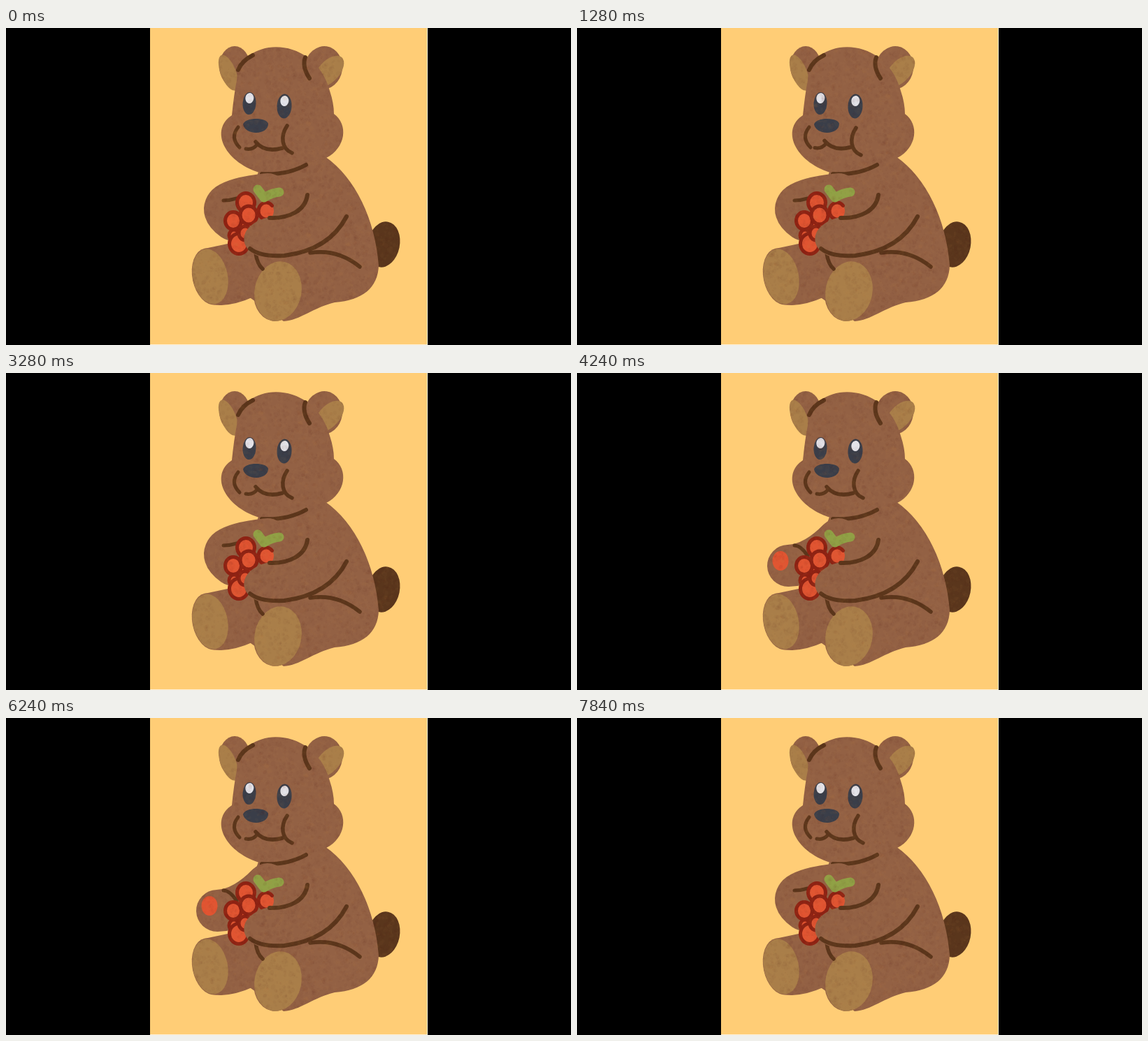
Recreate the animation shown at these times as an HTML page with a canvas. Size 808 px wide and 454 px high, loop 7920 ms.

```html
<!DOCTYPE html>
<html lang="en">
<head>
<meta charset="utf-8">
<title>Bear eating berries</title>
<style>
html, body { margin: 0; width: 100%; height: 100%; overflow: hidden; background: #000; }
canvas { display: block; width: 808px; height: 454px; }
</style>
</head>
<body>
<canvas id="stage" width="808" height="454"></canvas>
<script>
const W = 808, H = 454, LOOP = 7920, BITE = LOOP / 4, STEP = 80;
const FUR = '#936144', LINE = '#5b361b', TAN = '#a97e49', TAIL = '#5a361c';
const INK = '#3a3e49', SHINE = '#e3e3e9', BERRY = '#e15431', RIM = '#8e2213', LEAF = '#90a145';

const stage = document.getElementById('stage').getContext('2d');
const layer = document.createElement('canvas');
layer.width = W;
layer.height = H;
const c = layer.getContext('2d');

// Near arm: elbow x, y and paw x, y
const POSES = {
  rest: [286, 247, 325, 275],
  show: [338, 275, 302, 276],
  reach: [330, 262, 270, 265],
  lift: [285, 265, 305, 208],
  feed: [272, 262, 338, 198],
  fling: [228, 262, 330, 212],
  lower: [271, 274, 323, 235]
};
// Time, pose, how far the head is raised
const KEYS = [
  [0, 'rest', 0], [90, 'rest', 0], [220, 'show', 0], [305, 'show', 0],
  [385, 'reach', 0], [425, 'reach', 0], [460, 'lift', 1.1], [620, 'feed', 1.1],
  [840, 'feed', 1.1], [900, 'fling', 2.4], [930, 'fling', 2.4],
  [1000, 'lower', 1], [1130, 'rest', 0], [BITE, 'rest', 0]
];
const SHOULDER = [374, 238], ARM_R = 30;
const OPEN = 460, CATCH = 880, SHUT = 1070;

const mix = (a, b, k) => a + (b - a) * k;

function poseAt(t) {
  const i = KEYS.findIndex(k => k[0] > t);
  const [t0, from, lift0] = KEYS[i - 1], [t1, to, lift1] = KEYS[i];
  let k = (t - t0) / (t1 - t0);
  k = k * k * (3 - 2 * k);
  return {
    arm: POSES[from].map((v, j) => mix(v, POSES[to][j], k)),
    lift: mix(lift0, lift1, k)
  };
}

function shape(d, color = FUR) {
  c.fillStyle = color;
  c.fill(new Path2D(d));
}

function line(d, width = 5.5, color = LINE) {
  c.strokeStyle = color;
  c.lineWidth = width;
  c.stroke(new Path2D(d));
}

function oval(x, y, rx, ry, color = FUR, turn = 0) {
  c.beginPath();
  c.ellipse(x, y, rx, ry, turn, 0, Math.PI * 2);
  c.fillStyle = color;
  c.fill();
}

function drupe(x, y, r, from = 0, to = Math.PI * 2) {
  oval(x, y, r, r + 1, BERRY);
  c.beginPath();
  c.ellipse(x, y, r, r + 1, 0, from, to);
  c.strokeStyle = RIM;
  c.lineWidth = 5;
  c.stroke();
}

function drawBody() {
  oval(540, 310, 23, 33, TAIL, 0.2);
  shape('M362 203 L456 184 C500 214 528 275 533 340 C532 372 510 390 470 393 ' +
    'C440 400 420 419 397 420 L340 380 L331 306 Q340 262 352 232 Z');
  shape('M284 316 L331 306 L360 330 L354 385 Q330 396 308 397 Q285 398 272 375 Z');
  oval(292, 356, 25.5, 41, FUR, -0.2);
  oval(292, 356, 25, 40, TAN, -0.2);
  oval(388, 377, 33.5, 43, FUR, 0.2);
  oval(389, 377, 33.5, 43, TAN, 0.2);
  line('M435 322 Q474 316 506 342');
  line('M357 322 Q359 338 367 345');
  line('M371 210 Q363 219 359 229');
}

function drawEars() {
  oval(327, 55, 22, 29);
  shape('M328 90 L312 76 L345 50 L345 90 Z');
  oval(318, 64, 27, 11, TAN, 1.2);
  oval(454, 57, 27, 31, FUR, 0.15);
  oval(462, 62, 27, 15, TAN, -0.83);
}

function drawMouth(t) {
  if (t >= OPEN && t < SHUT) {
    oval(361, 174, 25.5, 9.5, INK, 0.06);
    if (t >= CATCH) oval(360.5, 172, 14, 11, BERRY);
    line('M356 157 Q358 162 364 163', 5);
    line('M386 158 Q385 174 396 184');
    line('M333 141 Q322 152 329 163', 5);
    return;
  }
  const chew = t > 1110 && t < 1650 && (t - 1110) % 340 < 180;
  const dx = chew ? -3 : 0;
  line('M332 142 Q320 157 334 171', 5);
  c.save();
  c.translate(dx, dx / 2);
  line('M343 173 Q353 175 359 167', 5);
  line('M357 163 Q370 179 395 172');
  c.translate(0, -dx * 1.5);
  line('M402 140 C392 155 394 173 409 179');
  c.restore();
}

function drawHead(t, lift) {
  const tilt = Math.min(lift, 1.2);
  c.save();
  // The crown stretches up while the chin almost stays
  c.translate(1.2 * tilt, 207 - 2 * lift);
  c.scale(1, 1 + lift / 60);
  c.translate(0, -207);
  drawEars();
  shape('M330 75 C333 12 440 6 463 90 Q469 108 469 123 C490 138 486 172 458 186 ' +
    'Q430 205 362 207 C310 190 292 145 323 125 Q326 95 330 75 Z');
  line('M332 60 Q337 47 353 39', 6);
  line('M428 42 Q423 55 434 72', 6);
  c.translate(0.5 * tilt, -6 * tilt);
  for (const [x, y, rx, ry] of [[348, 108, 9.5, 16], [398, 112, 10.5, 17.5]]) {
    oval(x, y, rx, ry, INK, 0.05);
    oval(x + 0.3, y - 7.5, 6, 7.5, SHINE, 0.15);
  }
  shape('M339 138 C342 127 373 128 375 137 C375 154 342 154 339 138 Z', INK);
  drawMouth(t);
  c.restore();

  c.save();
  c.translate(-2 * tilt, -3.5 * tilt);
  line('M366 209 Q402 211 429 196', 6);
  c.restore();
}

// Round brush pulled from the shoulder round the elbow to the paw
function drawArm([ex, ey, px, py]) {
  c.beginPath();
  c.moveTo(...SHOULDER);
  c.quadraticCurveTo(ex, ey, px, py);
  c.strokeStyle = FUR;
  c.lineWidth = ARM_R * 2;
  c.stroke();
  line(`M311 247 Q320 247 330 ${mix(244, 262, (ex - 286) / 52)}`, 5);
}

function drawBunch() {
  oval(336, 290, 14, 22, BERRY);
  drupe(326, 297, 7);
  drupe(333, 309, 13.5);
  drupe(342, 294, 9);
  drupe(343, 250, 12.5);
  drupe(325, 276, 11.5);
  drupe(372, 262, 11, 0.9, 5.6);
  drupe(347, 268, 12);
  line('M360 231 L369 243 Q380 236 391 235', 13, LEAF);
}

function drawFarArm() {
  shape('M380 270 C330 280 330 318 365 328 L430 318 L430 260 Z');
  line('M431 239 C428 262 404 273 377 272', 6);
  line('M487 270 Q462 318 398 326 Q364 328 349 316', 6);
}

// Paper grain laid over the drawing
function seeded(seed) {
  return () => (seed = (seed * 16807) % 2147483647) / 2147483647;
}

function makeGrain(size) {
  const tile = document.createElement('canvas');
  tile.width = tile.height = size;
  const g = tile.getContext('2d'), rnd = seeded(71);
  for (let i = 0; i < 1800; i++) {
    const r = 0.8 + rnd() * 2.6;
    g.fillStyle = rnd() < 0.5 ? 'rgba(90,40,20,0.035)' : 'rgba(185,130,90,0.035)';
    g.beginPath();
    g.ellipse(rnd() * size, rnd() * size, r, r * (0.5 + rnd()), rnd() * 3, 0, 7);
    g.fill();
  }
  return tile;
}
const GRAIN = 160;
const grain = c.createPattern(makeGrain(GRAIN), 'repeat');

function addGrain(step) {
  const rnd = seeded(step * 917 + 13);
  rnd();
  c.save();
  c.globalCompositeOperation = 'source-atop';
  c.translate(-Math.floor(rnd() * GRAIN), -Math.floor(rnd() * GRAIN));
  c.fillStyle = grain;
  c.fillRect(0, 0, W + GRAIN, H + GRAIN);
  c.restore();
}

function draw(time) {
  const step = Math.floor((time % LOOP) / STEP);
  const t = (step * STEP) % BITE;
  const { arm, lift } = poseAt(t);

  c.clearRect(0, 0, W, H);
  c.lineCap = c.lineJoin = 'round';
  drawBody();
  drawHead(t, lift);
  drawArm(arm);
  if (t > 110 && t < CATCH) oval(arm[2] - 11, arm[3] - 7, 11.5, 14, BERRY);
  drawBunch();
  drawFarArm();
  addGrain(step);

  stage.fillStyle = '#000';
  stage.fillRect(0, 0, W, H);
  stage.fillStyle = '#fff0d4';
  stage.fillRect(206, 0, 397, H);
  stage.fillStyle = '#ffcd76';
  stage.fillRect(206, 0, 396, H - 1);
  stage.drawImage(layer, 0, 0);
}

const start = performance.now();
function tick(now) {
  draw(Math.max(0, now - start));
  requestAnimationFrame(tick);
}
draw(0);
requestAnimationFrame(tick);
</script>
</body>
</html>
```
